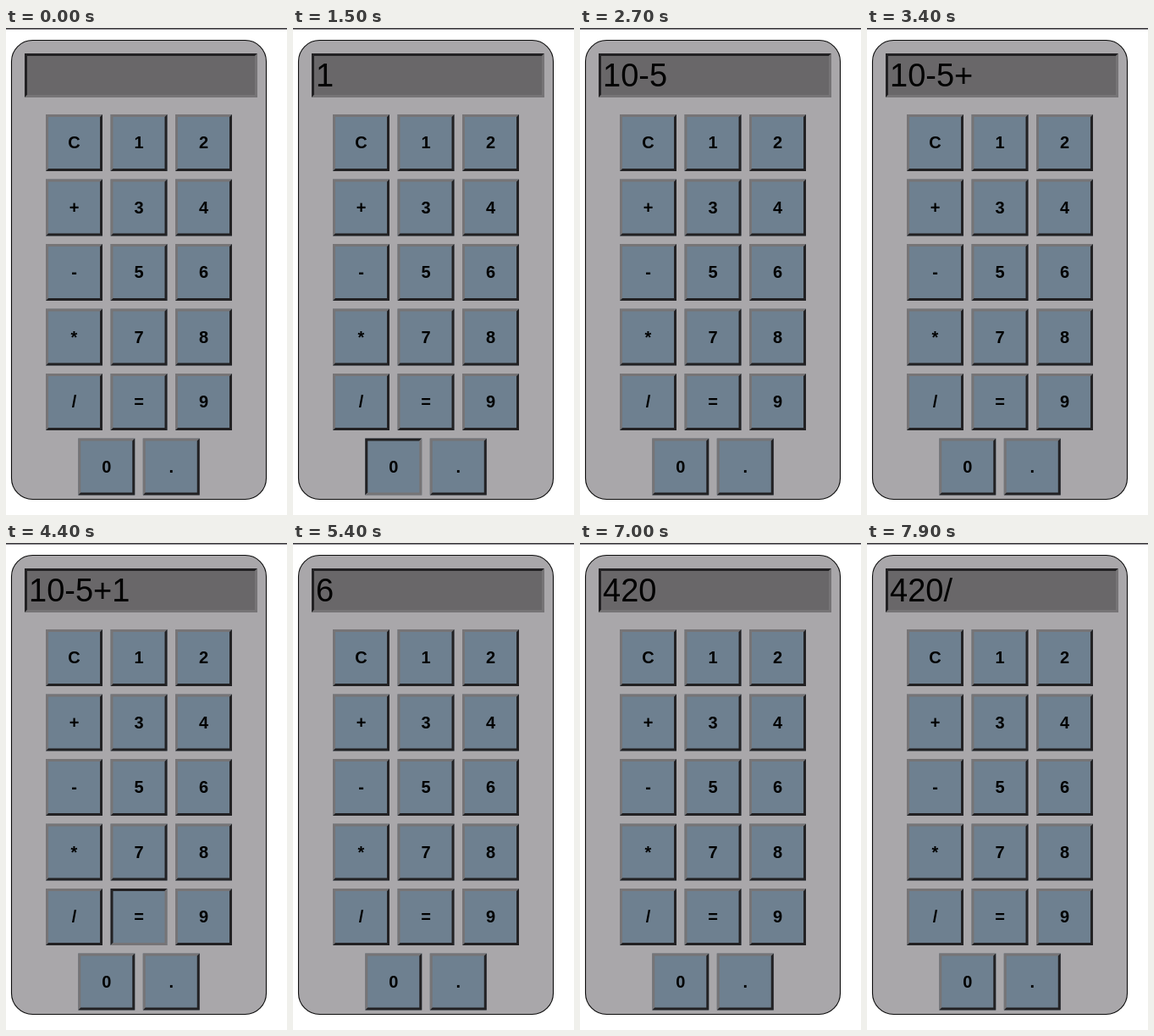
These frames come from a looping animation (332x575 px, 8 s). An HTML page:

```html
<!DOCTYPE html>
<html lang="en">
<head>
<meta charset="utf-8">
<title>Calculator</title>
<style>
html, body { margin: 0; width: 100%; height: 100%; overflow: hidden; background: #fff; }
svg { display: block; width: 100vw; height: 100vh; }
text { font-family: "Liberation Sans", Arial, sans-serif; }
.key text { font-size: 20px; font-weight: bold; text-anchor: middle; }
</style>
</head>
<body>
<svg id="stage" viewBox="0 0 332 575">
  <rect width="332" height="1.6" fill="#38363a"/>
  <rect x="6.5" y="14.5" width="301" height="542" rx="25" fill="#a9a7aa" stroke="#0c0c0c" stroke-width="1.1"/>
</svg>
<script>
const LOOP = 8000, DARK = '#222123', LIGHT = '#767476';
const SIZE = 67, PITCH = 76.5;
const stage = document.getElementById('stage');

function add(parent, tag, attrs, text = '') {
  const el = document.createElementNS('http://www.w3.org/2000/svg', tag);
  for (const name in attrs) el.setAttribute(name, attrs[name]);
  el.textContent = text;
  parent.appendChild(el);
  return el;
}

// Filled box with a mitred 3D border; returns a function that sets its state.
function bevel(parent, x, y, w, h, b, fill) {
  add(parent, 'rect', { x, y, width: w, height: h, fill });
  const r = x + w, d = y + h;
  const upper = add(parent, 'path', {
    d: `M${x} ${d}V${y}H${r}l${-b} ${b}H${x + b}V${d - b}Z`
  });
  const lower = add(parent, 'path', {
    d: `M${x} ${d}H${r}V${y}l${-b} ${b}V${d - b}H${x + b}Z`
  });
  return inset => {
    upper.setAttribute('fill', inset ? DARK : LIGHT);
    lower.setAttribute('fill', inset ? LIGHT : DARK);
  };
}

bevel(stage, 22, 30, 275, 52, 3, '#696769')(true);
const display = add(stage, 'text', { x: 27, y: 69, 'font-size': 38 });

const keys = {};
['C12', '+34', '-56', '*78', '/=9', '0.'].forEach((row, j) => {
  const left = 47 + (3 - row.length) * PITCH / 2;
  [...row].forEach((label, i) => {
    const x = left + i * PITCH, y = 102 + j * PITCH;
    const g = add(stage, 'g', { class: 'key' });
    keys[label] = bevel(g, x, y, SIZE, SIZE, 3, '#6e8090');
    add(g, 'text', { x: x + SIZE / 2, y: y + 40 }, label);
  });
});

// [time, display, pressed key]
const steps = [
  [0, ''], [1100, '', '1'], [1200, '1'],
  [1500, '1', '0'], [1600, '10'],
  [2300, '10', '-'], [2400, '10-'],
  [2600, '10-', '5'], [2700, '10-5'],
  [3100, '10-5', '+'], [3200, '10-5+'],
  [3800, '10-5+', '1'], [3900, '10-5+1'],
  [4400, '10-5+1', '='], [4500, '6'],
  [5800, '6*'], [6200, '6*7'], [6500, '6*70'],
  [6900, '6*70', '='], [7000, '420'],
  [7600, '420', '/'], [7700, '420/']
];

function render(t) {
  const [, shown, pressed] = steps.findLast(s => s[0] <= t);
  display.textContent = shown;
  for (const label in keys) keys[label](label === pressed);
}

const start = performance.now();
function tick() {
  render((performance.now() - start) % LOOP);
  requestAnimationFrame(tick);
}
tick();
</script>
</body>
</html>
```
